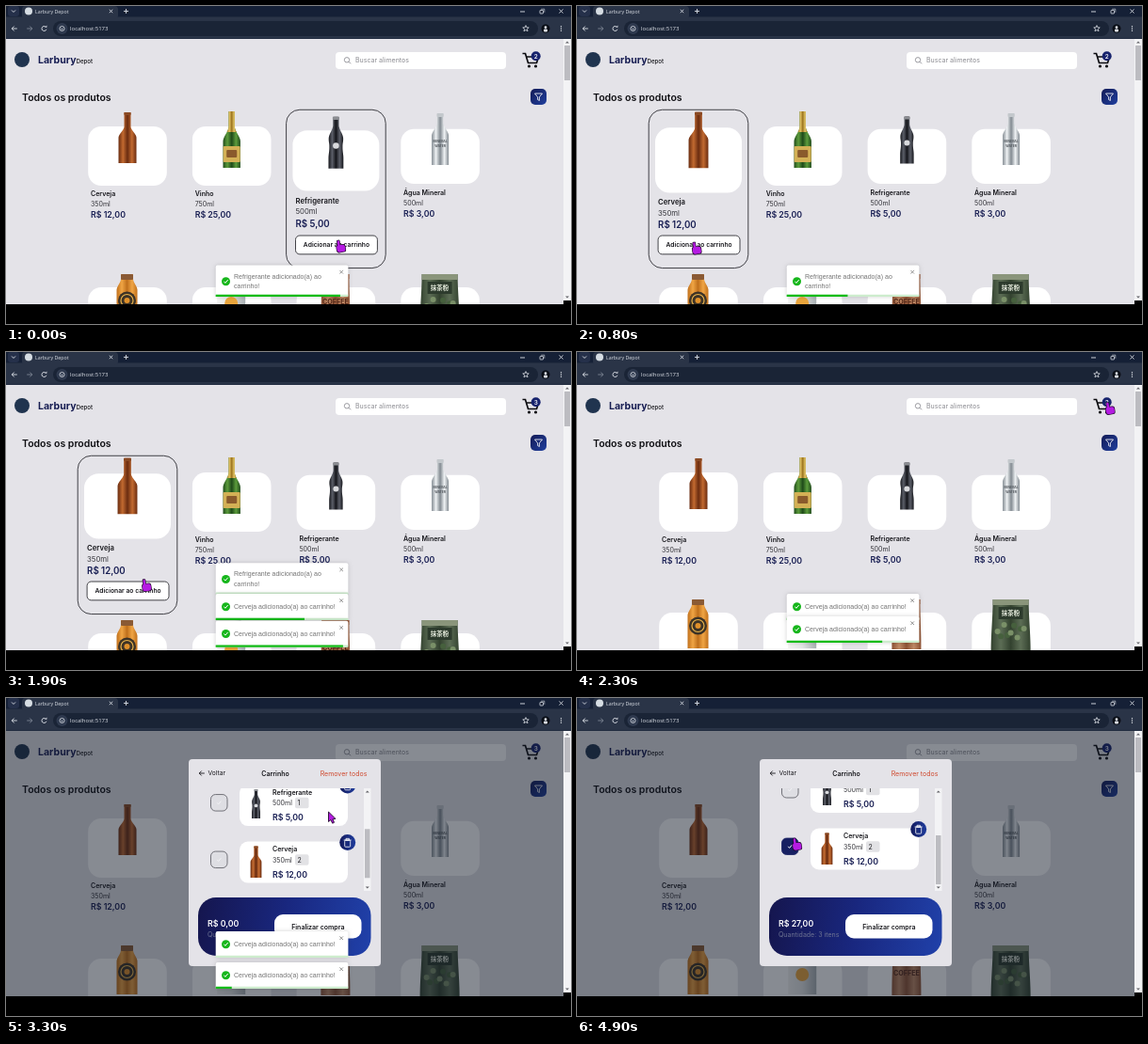
An HTML page with a canvas that plays this animation: 600 px wide and 338 px high, repeating every 5000 ms.

```html
<!DOCTYPE html>
<html lang="pt-BR">
<head>
<meta charset="utf-8">
<title>Larbury Depot</title>
<style>
html, body { margin: 0; width: 100%; height: 100%; overflow: hidden; background: #000; }
canvas { display: block; width: 100vw; height: 100vh; }
</style>
</head>
<body>
<canvas></canvas>
<script>
const LOOP = 5000, STEP = 100;
const NAVY = '#171d52', INK = '#17171c', PAGE = '#e4e3e8', PALE = '#dde1e8';
const UI = 'Inter, sans-serif', CHROME = '"Open Sans", sans-serif', PLAIN = '"Liberation Sans", Arial, sans-serif';
const REM = 7.03; // 16 css pixels of the pictured page
const canvas = document.querySelector('canvas');
const c = canvas.getContext('2d');
const ratio = window.devicePixelRatio || 1;
canvas.width = 600 * ratio;
canvas.height = 338 * ratio;

// Drawing helpers
function paint(fill, stroke, lw) {
  if (fill) { c.fillStyle = fill; c.fill(); }
  if (stroke) { c.strokeStyle = stroke; c.lineWidth = lw; c.stroke(); }
}
function rect(x, y, w, h, fill, r = 0, stroke, lw = .8) {
  c.beginPath();
  c.roundRect(x, y, w, h, r);
  paint(fill, stroke, lw);
}
function circle(x, y, r, fill, stroke, lw = .8) {
  c.beginPath();
  c.arc(x, y, r, 0, 7);
  paint(fill, stroke, lw);
}
function poly(points, fill, stroke, lw = .8, close = true) {
  c.beginPath();
  points.forEach(([x, y]) => c.lineTo(x, y));
  if (close) c.closePath();
  paint(fill, stroke, lw);
}
const line = (points, color, lw = .9) => poly(points, null, color, lw, false);
// y is the middle of the capital letters
function text(s, x, y, size = REM, weight = 400, color = INK, align = 'left', font = UI) {
  c.font = `${weight} ${size}px ${font}`;
  c.textAlign = align;
  c.fillStyle = color;
  c.fillText(s, x, y + size * .36);
}
function gradient(x0, y0, x1, y1, ...colors) {
  const g = c.createLinearGradient(x0, y0, x1, y1);
  colors.forEach((col, i) => g.addColorStop(i / (colors.length - 1), col));
  return g;
}
function local(x, y, s, draw) {
  c.save();
  c.translate(x, y);
  c.scale(s, s);
  draw();
  c.restore();
}
function clipTo(x, y, w, h, draw) {
  c.save();
  c.beginPath();
  c.rect(x, y, w, h);
  c.clip();
  draw();
  c.restore();
}
function cross(x, y, r, color) {
  line([[x - r, y - r], [x + r, y + r]], color);
  line([[x + r, y - r], [x - r, y + r]], color);
}
const tick = (x, y, color) => line([[x - 2, y], [x - .6, y + 1.6], [x + 2.2, y - 1.7]], color, 1);
// d = 1 points right or down, d = -1 left or up
const chevron = (x, y, d, r, color) => line([[x - d * r, y - r], [x, y], [x - d * r, y + r]], color);
const arrowUp = (x, y, d) => poly([[x - 2, y + d], [x, y - d], [x + 2, y + d]], '#606066');
function backArrow(x, y, d, color) {
  line([[x - 2.8, y], [x + 2.8, y]], color);
  chevron(x + d * 2.8, y, d, 2.5, color);
}

// Eased 0 to 1 between the times a and b
function ramp(t, a, b) {
  const u = Math.min(1, Math.max(0, (t - a) / (b - a)));
  return u * u * (3 - 2 * u);
}

// Symmetric silhouette of height h, shaded from edge to middle
function body(h, width, edge, mid) {
  const right = [], left = [];
  for (let y = 0; y <= h; y++) {
    right.push([width(y), y]);
    left.unshift([-width(y), y]);
  }
  const w = width(h);
  poly([...right, ...left], gradient(-w, 0, w, 0, edge, mid, edge, mid, edge));
}
const bottle = (neck, wide, from, to) => y => neck + (wide - neck) * ramp(y, from, to);

const art = {
  beer() {
    body(54, bottle(3.5, 9.5, 15, 27), '#6a2c10', '#c26a30');
    rect(-3.6, 0, 7.2, 3, '#8a4a24', 1);
  },
  wine() {
    const width = bottle(3.2, 9.2, 16, 32);
    body(60, width, '#1f4a1a', '#5c9c3c');
    body(22, width, '#9a7420', '#e6c567');
    rect(-9, 37, 18, 17, '#d3b055', 1);
    rect(-5.5, 41, 11, 8, '#8a5a2c', 1);
  },
  soda() {
    const width = bottle(2.8, 7, 8, 21);
    body(50, y => width(y) - .6 * ramp(y, 22, 28) + .8 * ramp(y, 30, 40), '#15161b', '#5b5e68');
    rect(-3.2, 0, 6.4, 3, '#8b8d92', 1);
    circle(0, 28, 3, '#d9dadd');
  },
  water() {
    body(55, bottle(3.3, 9, 10, 24), '#838b92', '#eef1f3');
    rect(-3.6, 0, 7.2, 4, '#c3c8cc', 1);
    text('MINERAL', 0, 30, 3.4, 600, '#4b5157', 'center');
    text('WATER', 0, 35, 3.4, 600, '#4b5157', 'center');
  },
  juice() {
    body(52, bottle(6.5, 11, 5, 17), '#c0701c', '#f0a544');
    rect(-6.5, 0, 13, 6, '#8a5a34', 1);
    circle(0, 28, 9.5, '#3d3326');
    circle(0, 28, 6.5, null, '#e8b24b', 1.2);
    circle(0, 28, 3, '#e0902a');
  },
  carton() {
    poly([[-12, 3], [10, 0], [15, 10], [15, 52], [-15, 52], [-15, 11]], gradient(-15, 0, 15, 0, '#f3f3f1', '#e3e5e5', '#a9b0b3'));
    line([[-15, 11], [15, 10]], '#a9b3b8');
    rect(-12, 17, 16, 4, '#6c8f9a', 1);
    circle(0, 31, 7, '#e9a53c');
  },
  coffee() {
    body(53, bottle(14.5, 15.5, 0, 50), '#8e5234', '#c08a66');
    rect(-14.5, 0, 29, 5, '#9c6244');
    text('COFFEE', 0, 29, 7.2, 700, '#562a1a', 'center');
  },
  pouch() {
    body(54, bottle(19, 21, 0, 54), '#33422f', '#5c6d55');
    rect(-19, 0, 38, 6, '#8a957b');
    rect(-13, 8, 26, 13, '#2d3b2d');
    text('抹茶粉', 0, 14.5, 6.5, 700, '#e4eadb', 'center', '"Noto Sans CJK SC", "Noto Sans CJK JP", sans-serif');
    for (let i = 0; i < 9; i++) circle(-14 + i * 3.5, 34 + 7 * Math.sin(i * 2.3), 3, i % 2 ? '#46603d' : '#7a9068');
  }
};

const products = [
  { art: 'beer', name: 'Cerveja', size: '350ml', price: 12, top: 113, tall: true },
  { art: 'wine', name: 'Vinho', size: '750ml', price: 25, top: 112, tall: true },
  { art: 'soda', name: 'Refrigerante', size: '500ml', price: 5, top: 117.5 },
  { art: 'water', name: 'Água Mineral', size: '500ml', price: 3, top: 114 }
];
const lowerRow = ['juice', 'carton', 'coffee', 'pouch'];
const [beer, , soda, water] = products;
const cart = [{ ...water, qty: 1, checkedAt: 4100 }, { ...soda, qty: 1, checkedAt: Infinity }, { ...beer, qty: 2, checkedAt: 4800 }];
const OPEN = 2400, BADGE = 1100, LIFE = 1667;
const toasts = [
  { lines: ['Refrigerante adicionado(a) ao', 'carrinho!'], mount: -999, start: -100 },
  { lines: ['Cerveja adicionado(a) ao carrinho!'], mount: 1000, start: 1350 },
  { lines: ['Cerveja adicionado(a) ao carrinho!'], mount: 1550, start: 1835 }
];

// Where the pointer goes, and when each move begins and ends
const moves = [
  { x: 351.5, y: 249.5, from: -2, to: -1 },
  { x: 123, y: 251.5, from: 50, to: 650 },
  { x: 126.5, y: 250.5, from: 900, to: 1400 },
  { x: 562, y: 54, from: 1850, to: 2250 },
  { x: 342.5, y: 121, from: 2400, to: 2800 },
  { x: 223, y: 122.5, from: 3400, to: 3800 },
  { x: 229.5, y: 149.5, from: 4300, to: 4700 }
];
function pointer(t) {
  const p = { x: 0, y: 0 };
  for (const m of moves) {
    const u = ramp(t, m.from, m.to);
    p.x += (m.x - p.x) * u;
    p.y += (m.y - p.y) * u;
  }
  return p;
}
const columnX = i => 129 + 110.7 * i;
function hovered(t) {
  const { x, y } = pointer(t);
  const i = Math.round((x - columnX(0)) / 110.7);
  return t < OPEN && y > 110 && Math.abs(x - columnX(i)) < 53 ? i : -1;
}
const scrollAt = t => 90 * (ramp(t, 2600, 3150) - ramp(t, 3200, 3600) + ramp(t, 4300, 4700));
const money = n => `R$ ${n},00`;

function browser() {
  rect(0, 0, 600, 35, '#152036');
  rect(0, 11.5, 600, 23, '#2a3447');
  rect(2, 0, 12, 11, '#25304a', 3);
  line([[6, 4.5], [8, 6.5], [10, 4.5]], PALE);
  rect(17, 0, 102, 14, '#2a3447', 4);
  circle(24, 5.5, 4, '#d6dde3');
  text('Larbury Depot', 31, 5.7, REM * .75, 400, PALE, 'left', CHROME);
  cross(111.5, 5.5, 1.7, PALE);
  line([[125, 5.5], [130, 5.5]], PALE);
  line([[127.5, 3], [127.5, 8]], PALE);
  line([[546, 6], [551, 6]], PALE);
  rect(567, 4.5, 3.5, 3.5, null, .5, PALE);
  line([[568.2, 3.2], [571.8, 3.2], [571.8, 6.8]], PALE, .6);
  cross(589.5, 5.5, 2, PALE);

  backArrow(9, 24, -1, PALE);
  backArrow(25, 24, 1, '#7d8594');
  c.beginPath();
  c.arc(40.5, 24, 2.5, .3, 5.4);
  paint(null, PALE, .9);
  poly([[41.2, 22.8], [43.4, 22.8], [43.4, 20.6]], PALE);
  rect(50, 16, 515, 16, '#1a2436', 8);
  circle(59.5, 24, 6, '#2f3a4f');
  circle(59.5, 24, 2.5, null, PALE);
  line([[59.5, 23.7], [59.5, 25.4]], PALE);
  text('localhost:5173', 68, 24.2, 6, 400, PALE, 'left', CHROME);
  poly(Array.from({ length: 10 }, (_, i) => {
    const r = i % 2 ? 1.5 : 3.4, a = i * Math.PI / 5 - Math.PI / 2;
    return [552 + r * Math.cos(a), 24 + r * Math.sin(a)];
  }), null, PALE);
  circle(573, 24, 4.5, '#0a0e16');
  circle(573, 22.7, 1.4, PALE);
  rect(571, 24.4, 4, 3, PALE, 1.2);
  for (let i = -1; i < 2; i++) circle(589.5, 24 + 2.2 * i, .7, PALE);
}

function scrollbar(x, y, w, h, thumbY, thumbH) {
  rect(x, y, w, h, '#f3f3f5');
  rect(x + 1, thumbY, w - 2, thumbH, '#bcbcc1');
  arrowUp(x + w / 2, y + 3.5, 1);
  arrowUp(x + w / 2, y + h - 3.5, -1);
}

function header(t) {
  circle(17, 57, 8, '#20344f');
  text('Larbury', 34, 57.3, REM * 1.5, 700, NAVY);
  text('Depot', 34 + c.measureText('Larbury').width, 59, REM * .875, 500);
  rect(350, 49, 181, 18, '#fff', 4);
  circle(362, 57.3, 2.7, null, '#85858c');
  line([[364, 59.3], [366, 61.3]], '#85858c');
  text('Buscar alimentos', 371, 57.9, REM, 400, '#8b8b91');
  line([[548.5, 50.5], [551.5, 50.5], [554.5, 60.5], [563.5, 60.5], [565.5, 54]], '#0c0c10', 1.7);
  line([[552.5, 54], [560, 54]], '#0c0c10', 1.5);
  circle(555.5, 64, 1.6, '#0c0c10');
  circle(562.5, 64, 1.6, '#0c0c10');
  circle(562.7, 53.2, 5, '#17236d');
  text(t < BADGE ? '2' : '3', 562.7, 53.3, 6.4, 600, '#fff', 'center');
  text('Todos os produtos', 17, 97.3, REM * 1.5, 600, '#0e0e12');
  rect(557, 88, 17, 17, gradient(557, 88, 574, 105, '#131a55', '#20409f'), 5);
  poly([[561.5, 93], [569.5, 93], [566.4, 96.8], [566.4, 100.5], [564.6, 99.5], [564.6, 96.8]], null, '#fff');
}

function productCard(p, x, active) {
  const left = x - 39, row = p.tall ? 199.9 : 198.4;
  c.save();
  if (active) {
    c.translate(x, 115);
    c.scale(1.1, 1.1);
    c.translate(-x, -115);
    rect(x - 48, 110.7, 96, 153, null, 13, '#2b2b30');
    rect(left, 232.3, 79, 18, '#fff', 4, '#2b2b30');
    text('Adicionar ao carrinho', x + .5, 241.2, REM * .875, 600, INK, 'center');
  }
  rect(x - 41.8, p.tall ? 128 : 130.7, 83.6, p.tall ? 63 : 58.3, '#fff', 14);
  local(x, p.top, 1, art[p.art]);
  text(p.name, left, row, REM, 600);
  text(p.size, left, row + 10.8, REM, 400, '#34343a');
  text(money(p.price), left, row + 22.3, REM * 1.25, 600, NAVY);
  c.restore();
}

function shop(t) {
  const active = hovered(t);
  rect(0, 35, 592, 282, PAGE);
  header(t);
  lowerRow.forEach((name, i) => {
    const y = active < 0 ? 263 : 285;
    rect(columnX(i) - 41.8, y + 14, 83.6, 63, '#fff', 14);
    local(columnX(i) - .5, y, 1, art[name]);
  });
  products.forEach((p, i) => productCard(p, columnX(i), i === active));
}

function cartItem(item, y, checked) {
  rect(217.5, y + 10.5, 17.5, 17.5, checked ? '#172062' : '#dedee3', 5, checked ? '#172062' : '#55555c');
  tick(226.2, y + 19.3, checked ? '#fff' : '#f3f3f5');
  rect(248, y, 115, 44, '#fff', 9);
  local(265.5, y + 5, .62, art[item.art]);
  text(item.name, 283, y + 8.3, REM, 600);
  text(item.size, 283, y + 19.8, REM, 400, '#34343a');
  rect(307, y + 13.7, 14.5, 11.5, '#e2e2e5', 2);
  text(item.qty, 309.5, y + 19.8);
  text(money(item.price), 283, y + 35.2, REM * 1.25, 600, NAVY);
  circle(362.7, y + 1, 8.5, gradient(354, y, 371, y, '#131a5c', '#1f3c9c'));
  line([[358.7, y - 1.5], [366.7, y - 1.5]], '#fff');
  rect(361, y - 3.2, 3.4, 1.7, null, 0, '#fff');
  rect(359.7, y - 1.3, 6, 7, null, 1, '#fff');
}

function cartModal(t) {
  rect(0, 35, 592, 282, 'rgba(17,24,39,.5)');
  rect(194, 65, 204, 220, PAGE, 4);
  backArrow(208, 80, -1, INK);
  text('Voltar', 214.5, 79.8, 6.7);
  text('Carrinho', 286, 80.3, REM, 600, INK, 'center');
  text('Remover todos', 383.5, 80.3, REM, 400, '#cf4a30', 'right');

  const scroll = scrollAt(t);
  clipTo(204, 96, 184, 109, () => {
    cart.forEach((item, i) => cartItem(item, 107.5 + i * 60.5 - scroll, t >= item.checkedAt));
    scrollbar(380, 96, 7.5, 109, 103 + scroll * 43 / 90, 52);
  });

  const chosen = cart.filter(item => t >= item.checkedAt);
  const total = chosen.reduce((sum, item) => sum + item.price * item.qty, 0);
  const count = chosen.reduce((sum, item) => sum + item.qty, 0) || 2;
  rect(204, 212, 183.5, 62, gradient(204, 230, 387, 255, '#15164f', '#19277f', '#2040a8'), 19);
  text(money(total), 214, 239.6, REM * 1.25, 600, '#fff');
  text(`Quantidade: ${count} itens`, 214, 251.3, REM, 400, '#6d7392');
  rect(285, 230, 92.5, 25.5, '#fff', 9);
  text('Finalizar compra', 331.3, 243, REM, 600, INK, 'center');
}

// Shoots up from below, then settles with a small damped swing
function bounceIn(u) {
  if (u >= 1) return 0;
  if (u < .6) return 1300 * (1 - u / .6) ** 3 - 9;
  const v = (u - .6) / .4;
  return -9 * (1 - v) * Math.cos(3 * Math.PI * v);
}

function toast(item, i, t) {
  const end = item.start + LIFE, gone = (t - end) / 700;
  if (t <= item.mount || gone > 1) return;
  const later = toasts.slice(i + 1).filter(o => t > o.mount).length;
  const two = item.lines.length > 1, h = two ? 33.5 : 28;
  const y = 309 - h - 24 * later + bounceIn((t - item.mount) / 500) - 9 * ramp(gone, 0, .4) + 890 * ramp(gone, .45, 1);
  const mid = y + (two ? 17.3 : 13.7);
  c.save();
  c.shadowColor = 'rgba(0,0,0,.18)';
  c.shadowBlur = 4 * ratio;
  rect(222.7, y, 140.7, h, '#fff', 2);
  c.restore();
  circle(233.5, mid, 4.5, '#16b61b');
  tick(233.5, mid, '#fff');
  item.lines.forEach((s, n) => text(s, 242, (two ? y + 11.7 : mid) + n * 10.5, REM, 400, '#757575', 'left', PLAIN));
  cross(356.2, y + 7.2, 1.8, '#8a8a8a');
  rect(222.7, y + h - 2.2, 140.7, 2.2, '#cdeccd');
  rect(222.7, y + h - 2.2, 140.7 * Math.max(0, (end - t) / LIFE), 2.2, '#14bb19');
}

function hand() {
  c.rotate(-.15);
  const parts = grow => {
    rect(-grow, -grow, 2.4 + 2 * grow, 9 + 2 * grow, grow ? '#21082c' : '#b51be2', 1.2);
    rect(-1.5 - grow, 5 - grow, 9 + 2 * grow, 7.5 + 2 * grow, grow ? '#21082c' : '#b51be2', 2.5);
  };
  parts(.6);
  parts(0);
}
function arrow() {
  poly([[0, 0], [0, 10.5], [2.4, 8.5], [4.2, 12.2], [6, 11.3], [4.4, 7.8], [7.5, 7.4]], '#b51be2', '#21082c', .9);
}
function cursor(t) {
  const { x, y } = pointer(t);
  local(x, y, 1, y < 70 || y > 145 ? hand : arrow);
}

function draw(t) {
  c.setTransform(ratio, 0, 0, ratio, 0, 0);
  rect(0, 0, 600, 338, '#000');
  browser();
  clipTo(0, 35, 600, 282, () => {
    shop(t);
    if (t >= OPEN) cartModal(t);
    scrollbar(592, 35, 8, 278, 42, 37);
    toasts.forEach((item, i) => toast(item, i, t));
  });
  cursor(t);
}

const begin = performance.now();
function frame() {
  const t = (performance.now() - begin) % LOOP;
  draw(Math.floor(t / STEP) * STEP);
  requestAnimationFrame(frame);
}
frame();
</script>
</body>
</html>
```
